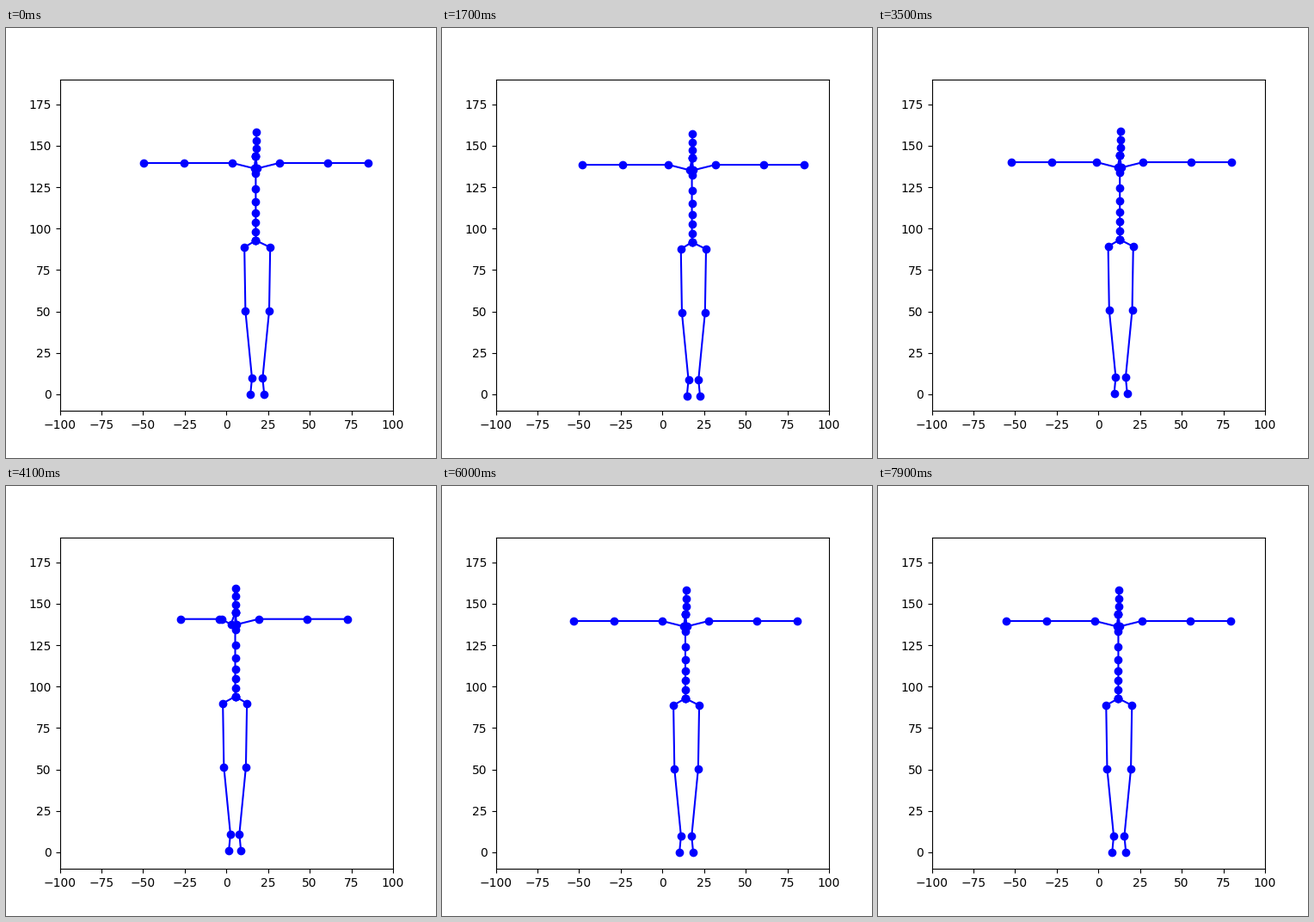
Recreate the animation shown at these times as a matplotlib script. Size 500 px wide and 500 px high, loop 8000 ms.

```python
import numpy as np
import matplotlib.pyplot as plt
from matplotlib.animation import FuncAnimation

FRAMES, STEP = 80, 100
ORIGIN = np.array([256.25, 425.75])   # pixel position of data (0, 0)
SCALE = np.array([1.9375, -1.925])    # pixels per data unit

# The figure swings its left arm once per cycle, leaning as it does so
PERIOD, FIRST_SWING = 28.75, 11.5
DRIFT_T = [0, 18, 35, 47, 53, 60, 68, 79]
DRIFT_X = [290.4, 298, 289.6, 283.3, 277, 283.2, 280, 279.5]

# Body at rest, in pixels
LOWER_SPINE = [247, 237, 226, 215, 202, 187, 169]
UPPER_SPINE = np.linspace(149.3, 121.4, 4)
LEG_Y = [255, 329, 407, 426]
LEG_HALF = np.array([15, 13.8, 6.2, 8])
LEG_MID = 1.8
ARM_Y = [163.3, 157, 157, 157]
ARM_BONES = np.array([25.4, 56, 47])
ARM_TURN = np.radians([65, 88, 13])   # turn out of the plane at full swing


def bump(t, width):
    return np.exp(-abs(t / width) ** 3)


def drift(n):
    """Slow wander of the body, eased between the key points."""
    i = min(np.searchsorted(DRIFT_T, n, "right"), len(DRIFT_T) - 1)
    s = (n - DRIFT_T[i - 1]) / (DRIFT_T[i] - DRIFT_T[i - 1])
    return DRIFT_X[i - 1] + (DRIFT_X[i] - DRIFT_X[i - 1]) * s * s * (3 - 2 * s)


def chain(xs, ys):
    return np.column_stack([xs, ys]).astype(float)


def arm(x, side, bend):
    reach = np.cumsum(ARM_BONES * np.cos(ARM_TURN * bend))
    return chain(x + side * (1.75 + 3.25 * bend + np.r_[0, reach]), ARM_Y)


def pose(n):
    """Spine, legs and arms as chains of pixel positions."""
    half = PERIOD / 2
    t = (n - FIRST_SWING + half) % PERIOD - half
    bend, lean = bump(t, 4.7), bump(t, 5.5)
    x = drift(n) - 20 * lean
    y = 2.9 * bump(t - 5.5, 1.5) - 2.3 * lean

    tilt = np.array([0, .7, .7, .7]) * (1 - lean)
    lower = chain([x] * len(LOWER_SPINE), LOWER_SPINE)
    upper = chain(x + tilt, UPPER_SPINE)
    limbs = [np.vstack([lower, upper])]

    hip = x + LEG_MID + .09 * (x - 290.4)
    spread = LEG_HALF - lean
    for side in (-1, 1):
        leg = chain(hip + side * spread, LEG_Y)
        limbs.append(np.vstack([lower[:1], leg]))
    for side, swing in ((-1, bend), (1, 0)):
        limbs.append(np.vstack([upper[:1], arm(x, side, swing)]))
    return [limb + (0, y) for limb in limbs]


fig, ax = plt.subplots(figsize=(5, 5), dpi=100)
ax.set_xlim(-100, 100)
ax.set_ylim(-10, 190)
ax.set_xticks(range(-100, 101, 25))
ax.set_yticks(range(0, 176, 25))
lines = [ax.plot([], [], "o-", color="#0000ff")[0] for _ in range(5)]


def draw(n):
    for line, limb in zip(lines, pose(n)):
        line.set_data(*((limb - ORIGIN) / SCALE).T)
    return lines


anim = FuncAnimation(fig, draw, frames=FRAMES, interval=STEP, repeat=True,
                     repeat_delay=0)
plt.show()
```
